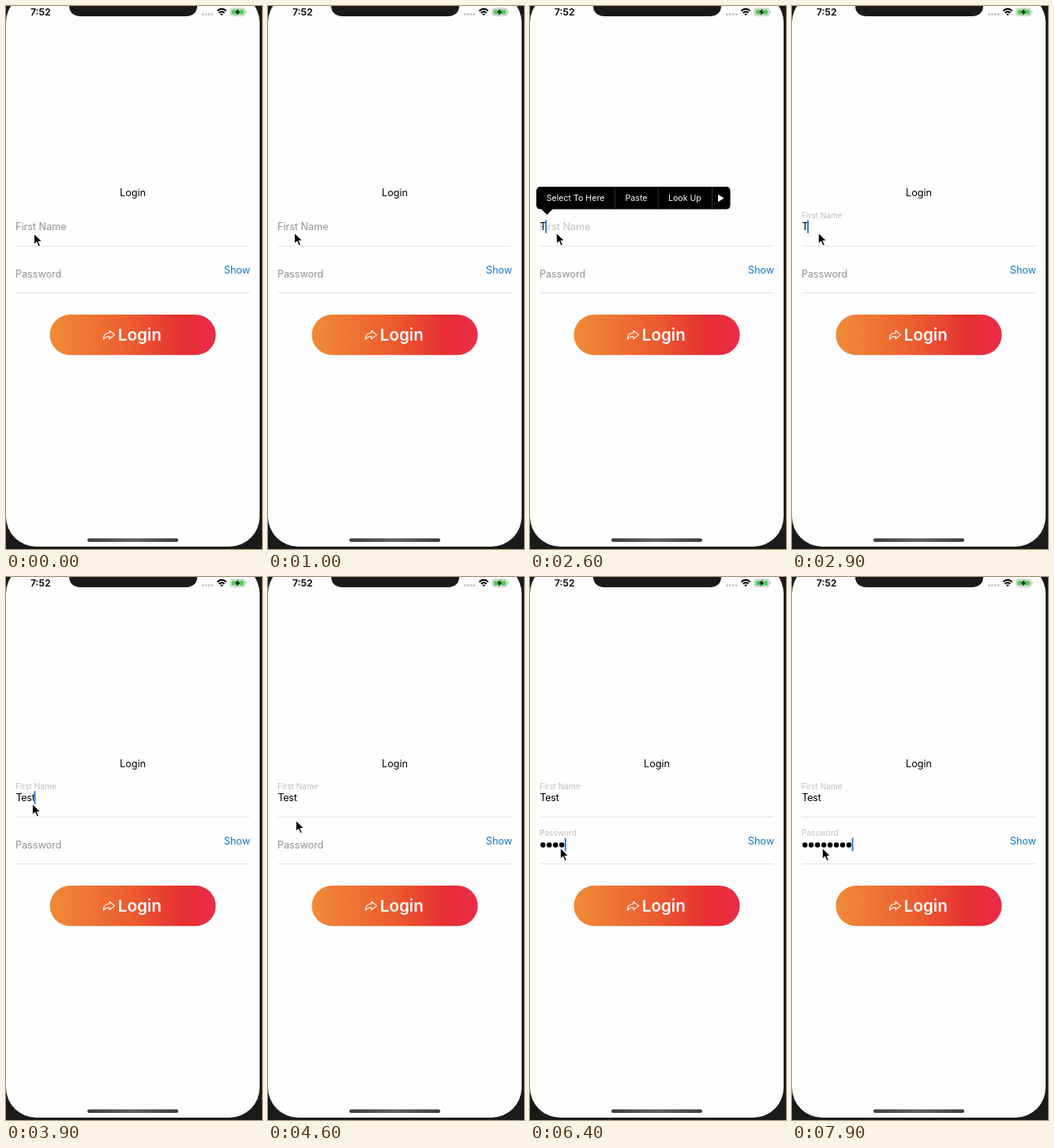
Write an HTML page that moves like this. It is 324 by 688 pixels and loops after 8 s.

```html
<!DOCTYPE html>
<html lang="en">
<head>
<meta charset="utf-8">
<title>Login form</title>
<style>
  html, body { margin: 0; width: 100%; height: 100%; overflow: hidden; background: #1a1a1b; }
  svg { display: block; width: 324px; height: 688px; }
  text { font: 12.6px Inter, "Liberation Sans", sans-serif; white-space: pre; }
  #menu text { font-size: 10.6px; fill: #fff; }
</style>
</head>
<body>
<svg viewBox="0 0 324 688">
  <defs>
    <linearGradient id="warm">
      <stop offset="0" stop-color="#f08b37"/>
      <stop offset=".5" stop-color="#ec5b2f"/>
      <stop offset=".8" stop-color="#e62f33"/>
      <stop offset="1" stop-color="#ea2c48"/>
    </linearGradient>
    <linearGradient id="bar">
      <stop offset="0" stop-color="#3c3c3c"/>
      <stop offset=".5" stop-color="#626262"/>
      <stop offset="1" stop-color="#3c3c3c"/>
    </linearGradient>
  </defs>
  <rect y="-17" width="321" height="702" rx="38" fill="#fefefe"/>
  <path d="M80 0C80 8 86 13 94 13H228C236 13 242 8 242 0Z" fill="#1a1a1b"/>

  <text x="31" y="12" style="font-size:12.2px;font-weight:600">7:52</text>
  <g fill="#c6c6c8">
    <circle cx="249.3" cy="10.5" r="1.5"/><circle cx="253.2" cy="10.5" r="1.5"/>
    <circle cx="257.1" cy="10.5" r="1.5"/><circle cx="261" cy="10.5" r="1.5"/>
  </g>
  <g fill="none" stroke="#000" stroke-width="2">
    <path d="M267.4 6.2Q273 1 278.6 6.2M269.6 8.7Q273 5.6 276.4 8.7"/>
    <path d="M271.2 10.2Q273 8.8 274.8 10.2L273 12.2Z" fill="#000" stroke="none"/>
  </g>
  <rect x="284" y="3" width="18.6" height="9.2" rx="2.6" fill="#fff" stroke="#aaa" stroke-width=".9"/>
  <rect x="285.4" y="4.4" width="15.8" height="6.4" rx="1.5" fill="#55cb5d"/>
  <path d="M303.7 6v3.2q1-.4 1-1.6t-1-1.6" fill="#aaa"/>
  <path d="M294.4 3.2L289.7 8.2H292.6L291.6 12L296.4 6.9H293.4Z" fill="#111"/>

  <text x="160.5" y="241.3" text-anchor="middle">Login</text>
  <path d="M12.5 304H308.5M12.5 363.5H308.5" stroke="#e2e2e2"/>
  <text x="309" y="338.6" text-anchor="end" fill="#1576ca">Show</text>
  <text id="nameLabel" x="12">First Name</text>
  <text id="passLabel" x="12">Password</text>
  <text id="name" x="12.4" y="284.3" letter-spacing="-.3"></text>
  <g id="dots"></g>
  <rect id="caret" width="2" height="17" rx="1" fill="#2f7bd8"/>

  <rect x="55.5" y="391" width="210" height="51.3" rx="25.6" fill="url(#warm)"/>
  <path d="M123.5 422.5C123 417 126 414.3 131 414.2V411.2L137.6 416.6L131 421.8V418.7C127.5 418.6 125.2 419.6 123.5 422.5Z"
        fill="none" stroke="#fff" stroke-width="1.1" stroke-linejoin="round"/>
  <text x="141.8" y="424.3" fill="#fff" style="font-size:20.6px;font-weight:600">Login</text>
  <rect x="103" y="674.5" width="115" height="4.4" rx="2.2" fill="url(#bar)"/>

  <g id="menu">
    <path d="M14 229H248Q253.5 229 253.5 234.500V252Q253.5 257.500 248 257.500H28.500L21.500 264.500L14.500 257.500H14Q8 257.500 8 252V234.500Q8 229 14 229Z"/>
    <path d="M107.500 229V257.500M162 229V257.500M230.500 229V257.500" stroke="#303030"/>
    <text x="20.800" y="247.100">Select To Here</text>
    <text x="120.600" y="247.100">Paste</text>
    <text x="175" y="247.100">Look Up</text>
    <path d="M238 238.800V248.200L245.500 243.500Z" fill="#fff"/>
  </g>
  <path id="pointer" d="M0 0V14.600L3.400 11.500L5.900 17L8.400 15.900L6 10.600H10.700Z"
        stroke="#fff" stroke-width="1.200" stroke-linejoin="round"/>
</svg>
<script>
const $ = id => document.getElementById(id);
const set = (el, attrs) => { for (const k in attrs) el.setAttribute(k, attrs[k]); };
const LOOP = 8000, STEP = 100, DOT = 7.95;
const FOCUS_NAME = 1400, FOCUS_PASS = 5100;
const nameKeys = [2580, 3000, 3500, 3650];
const passKeys = [5950, 6100, 6250, 6400, 6950, 7130, 7310, 7500];
const events = [FOCUS_NAME, ...nameKeys, FOCUS_PASS, ...passKeys];

const ramp = (t, start, len) => {
  const p = Math.min(1, Math.max(0, (t - start) / len));
  return p * p * (3 - 2 * p);
};
const mix = (a, b, p) => a + (b - a) * p;
const count = (keys, t) => keys.filter(k => k <= t).length;

const dots = passKeys.map((_, i) => {
  const c = document.createElementNS("http://www.w3.org/2000/svg", "circle");
  set(c, { cx: 16.4 + i * DOT, cy: 339.5, r: 3.2 });
  $("dots").append(c);
  return c;
});

function floatLabel(el, t, start, y) {
  const p = ramp(t, start, 280);
  set(el, { y: mix(y, y - 15.6, p), fill: t < start ? "#929292" : "#bfbfbf" });
  el.style.fontSize = mix(12.6, 10.1, p) + "px";
}

function draw(t) {
  floatLabel($("nameLabel"), t, nameKeys[0], 284.3);
  floatLabel($("passLabel"), t, passKeys[0], 343.8);

  const typed = count(nameKeys, t), hidden = count(passKeys, t);
  $("name").textContent = "Test".slice(0, typed);
  dots.forEach((d, i) => set(d, { opacity: i < hidden ? 1 : 0 }));

  const last = events.filter(e => e <= t).pop();
  const inPass = t >= FOCUS_PASS;
  const x = inPass ? hidden * DOT : typed ? $("name").getComputedTextLength() - .6 : 0;
  set($("caret"), {
    x: 12 + x,
    y: inPass ? 330.5 : 271,
    opacity: last !== undefined && (t - last) % 1000 < 530 ? 1 : 0
  });

  $("menu").style.opacity = ramp(t, 2150, 150) * (1 - ramp(t, 2600, 250));

  const nudge = ramp(t, 200, 400), move = ramp(t, 4350, 600);
  set($("pointer"), {
    transform: `translate(${35.3 - 2 * nudge + 5 * move} ${288 - nudge + 56 * move})`
  });
}

function tick(now) {
  draw(Math.floor(now % LOOP / STEP) * STEP);
  requestAnimationFrame(tick);
}
draw(0);
requestAnimationFrame(tick);
</script>
</body>
</html>
```
